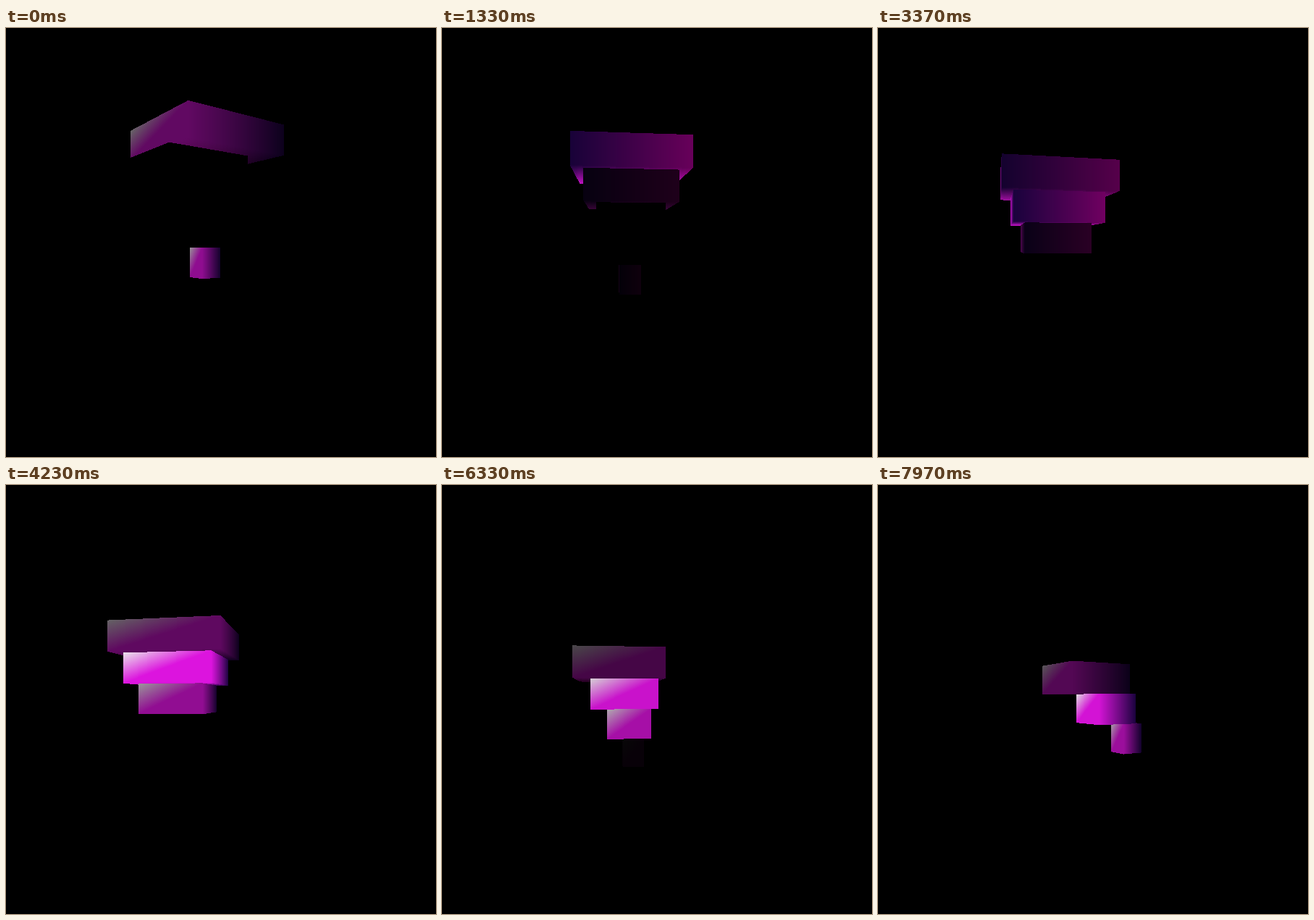
An HTML page with a canvas for the animation above (8000 ms loop, 594 by 592 pixels).

```html
<!DOCTYPE html>
<html lang="en">
<head>
<meta charset="utf-8">
<title>Turning tower</title>
<style>
  html, body { margin: 0; width: 100%; height: 100%; overflow: hidden; background: #000; }
  canvas { display: block; }
</style>
</head>
<body>
<canvas id="stage" width="594" height="592"></canvas>
<script>
const ctx = document.getElementById('stage').getContext('2d');
const W = 594, H = 592, LOOP = 8000;
const LAYERS = 5;
const DEPTH = 550;              // eye distance
const SIDE = 29.5, RISE = 40.2; // size of one step
const START = -8, SPIN = 180;   // degrees, degrees per second
const WAVE = 10.8, LAG = 1.8, FIRST_PEAK = 2.1, FADE = 3; // glow, in seconds

// Corner colours going round a box; the last corner is white on top
const LOWER = [[240, 22, 242], [30, 3, 70], [130, 0, 112], [240, 22, 242]];
const UPPER = [...LOWER.slice(0, 3), [255, 250, 255]];

const lerp = (a, b, u) => a + (b - a) * u;
const mix = (a, b, u) => a.map((v, i) => lerp(v, b[i], u));
const clamp = u => Math.min(1, Math.max(0, u));
const shade = (colour, light) => `rgb(${colour.map(v => Math.round(v * light)).join()})`;

// Slow swing of the whole tower
function pose(t) {
  const swing = 1 - Math.cos(0.27 * (t - 4.75));
  return { x: -57 + 49 * swing, top: 97.5 + 85 * swing, zoom: 0.967 + 0.085 * swing };
}

// Sideways slide of one layer: a bow that straightens, later a lean of the small steps
function slide(k, t) {
  const bow = clamp(1 - t / 1.2), lean = clamp((t - 5.85) / 2.12);
  return -38 * bow * Math.sin(Math.PI * (LAYERS - k) / 4) + 28.5 * lean * Math.max(0, 4 - k);
}

// The glow runs down the tower, one layer after another
function glow(k, t) {
  const peak = FIRST_PEAK + LAG * (LAYERS - k);
  const d = ((t - peak + WAVE * 1.5) % WAVE) - WAVE / 2;
  return Math.pow(clamp(1 - Math.abs(d) / FADE), 0.75);
}

// Where a screen column cuts the edge between two corners
function cut(a, b, x) {
  const w = clamp((x - a.x) / (b.x - a.x));
  const f = lerp(a.f, b.f, w);
  return { f, u: w * b.f / f };
}

function strip(x, y0, y1, stops) {
  y0 = Math.round(y0);
  y1 = Math.round(y1);
  if (y1 <= y0) return;
  const fill = ctx.createLinearGradient(0, y0, 0, y1);
  for (const [at, colour] of stops) fill.addColorStop(at, colour);
  ctx.fillStyle = fill;
  ctx.fillRect(x, y0, 1, y1 - y0);
}

// Each face is two triangles; the diagonal alternates from face to face
function drawFace(i, corners, top, bottom, light) {
  const j = (i + 1) % 4, a = corners[i], b = corners[j];
  const rising = i % 2 === 1;
  const end = Math.round(b.x);
  for (let x = Math.round(a.x); x < end; x++) {
    const { f, u } = cut(a, b, x + 0.5);
    const tint = (p, q) => shade(mix(p, q, u), light);
    strip(x, H / 2 - top * f, H / 2 - bottom * f, [
      [0, tint(UPPER[i], UPPER[j])],
      rising ? [1 - u, tint(LOWER[i], UPPER[j])] : [u, tint(UPPER[i], LOWER[j])],
      [1, tint(LOWER[i], LOWER[j])]
    ]);
  }
}

// Horizontal side of the box that faces the eye level
function drawCap(corners, y, colours, light) {
  const xs = corners.map(c => c.x);
  const end = Math.round(Math.max(...xs));
  for (let x = Math.round(Math.min(...xs)); x < end; x++) {
    const hits = [];
    corners.forEach((a, i) => {
      const j = (i + 1) % 4, b = corners[j], mid = x + 0.5;
      if ((a.x <= mid) === (b.x <= mid)) return;
      const { f, u } = cut(a, b, mid);
      hits.push({ y: H / 2 - y * f, colour: shade(mix(colours[i], colours[j], u), light) });
    });
    if (hits.length < 2) continue;
    const [near, far] = hits.sort((p, q) => p.y - q.y);
    strip(x, near.y, far.y, [[0, near.colour], [1, far.colour]]);
  }
}

function drawLayer({ k, x, top, bottom, zoom }, t) {
  const light = glow(k, t);
  const radius = k * SIDE * zoom / Math.SQRT2;
  const corners = LOWER.map((_, i) => {
    const angle = (START + SPIN * t + 90 * i) * Math.PI / 180;
    const f = DEPTH / (DEPTH - radius * Math.cos(angle));
    return { f, x: W / 2 + (x + radius * Math.sin(angle)) * f };
  });
  if (bottom > 0) drawCap(corners, bottom, LOWER, light);
  if (top < 0) drawCap(corners, top, UPPER, light);
  corners.forEach((_, i) => drawFace(i, corners, top, bottom, light));
}

function draw(t) {
  ctx.fillStyle = '#000';
  ctx.fillRect(0, 0, W, H);
  const { x, top, zoom } = pose(t), rise = RISE * zoom;
  const layers = [];
  for (let k = LAYERS; k > 0; k--) {
    const y = top - (LAYERS - k) * rise;
    layers.push({ k, x: x + slide(k, t), top: y, bottom: y - rise, zoom });
  }
  // layers nearest to eye level cover the others
  layers.sort((a, b) => Math.abs(b.top + b.bottom) - Math.abs(a.top + a.bottom));
  for (const layer of layers) drawLayer(layer, t);
}

const start = performance.now();
function tick() {
  draw(((performance.now() - start) % LOOP) / 1000);
  requestAnimationFrame(tick);
}
tick();
</script>
</body>
</html>
```
